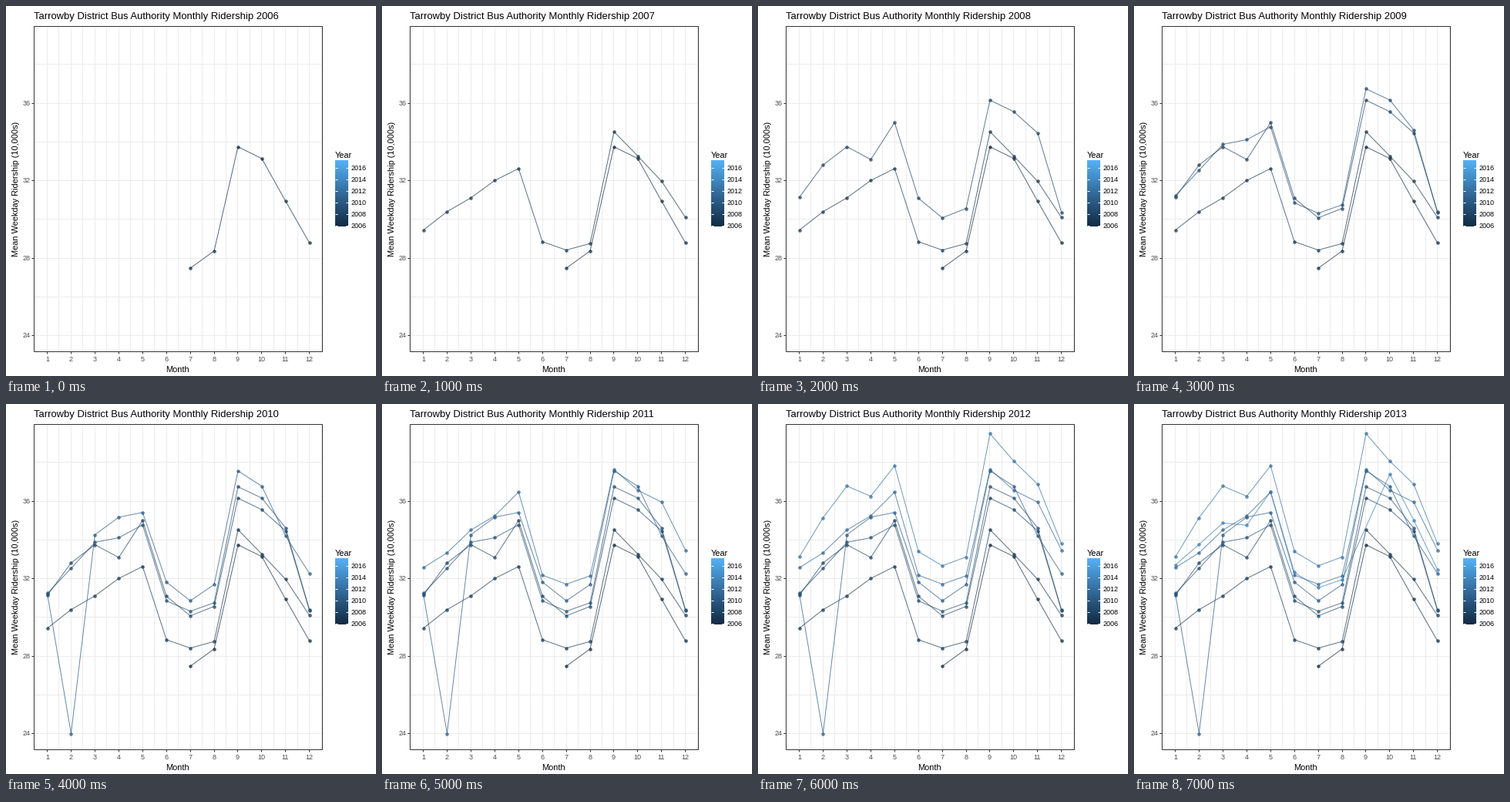
A matplotlib script that plays this animation: 480x480 px, repeating every 8000 ms.

```python
import matplotlib.pyplot as plt
import numpy as np
from matplotlib.animation import FuncAnimation
from matplotlib.colors import LinearSegmentedColormap
from matplotlib.patches import Rectangle

SIZE, DPI = 480, 80
PX = 72 / DPI  # points per pixel
LEFT, RIGHT, TOP, BOTTOM = 36, 410, 25, 447
GRID, FRAME, LABEL = "#EBEBEB", "#333333", "#4D4D4D"
FIRST_YEAR, SCALE_END = 2006, 2017
BLUES = LinearSegmentedColormap.from_list(
    "blues", ["#132B43", "#336A98", "#56B1F7"])

# Typical height of each month, and how far each year lies below it (pixels).
SEASON = np.array([232, 190, 166, 168, 138, 237, 258, 244, 96, 118, 158, 230])
YEAR_SHIFT = [78, 62, 16, 14, -7, -20, -49, -15]
STORM = (2010, 2, 427)
UNREPORTED = (2013, 9)

plt.rcParams["font.family"] = "Liberation Sans"
fig = plt.figure(figsize=(SIZE / DPI, SIZE / DPI), dpi=DPI, facecolor="white")
ax = fig.add_axes([0, 0, 1, 1])
ax.axis("off")


def month_x(month):
    return 53 + 30.93 * (month - 1)


def value_y(value):
    return 426.6 - 25.13 * (value - 24)


def year_heights():
    """Season plus yearly shift, with scatter that calms down in summer."""
    rng = np.random.default_rng(4)
    months = np.arange(1, 13)
    spread = 16 + 10 * np.cos(2 * np.pi * (months - 1) / 12)
    noise = rng.uniform(-1, 1, (len(YEAR_SHIFT), 12)) * spread
    heights = SEASON + np.array(YEAR_SHIFT)[:, None] + noise
    heights[0, :6] = np.nan  # records begin in July
    year, month, y = STORM
    heights[year - FIRST_YEAR, month - 1] = y
    year, month = UNREPORTED
    heights[year - FIRST_YEAR, month - 1] = np.nan
    return heights


def segment(x0, y0, x1, y1, color, z):
    ax.plot([x0, x1], [y0, y1], color=color, lw=PX, zorder=z,
            solid_capstyle="butt")


def label(x, y, text, size, color="black", **kwargs):
    return ax.text(x, y, text, fontsize=size * PX, color=color,
                   va="baseline", **kwargs)


def draw_panel():
    for half in range(1, 26):
        x = round(month_x(half / 2))
        segment(x, TOP, x, BOTTOM, GRID, 1)
    for value in range(24, 39, 2):
        y = int(value_y(value))
        segment(LEFT, y, RIGHT, y, GRID, 1)
    ax.add_patch(Rectangle((LEFT, TOP), RIGHT - LEFT, BOTTOM - TOP,
                           fill=False, ec=FRAME, lw=PX, zorder=5))
    for month in range(1, 13):
        x = round(month_x(month))
        segment(x, BOTTOM, x, BOTTOM + 3, FRAME, 5)
        label(x + 0.5, 460, str(month), 9, LABEL, ha="center")
    for value in range(24, 37, 4):
        y = int(value_y(value))
        segment(LEFT - 3, y, LEFT, y, FRAME, 5)
        label(31.5, y + 3, str(value), 9, LABEL, ha="right")
    label(222.5, 474, "Month", 11, ha="center")
    label(16.5, 236, "Mean Weekday Ridership (10,000s)", 11, ha="center",
          rotation=90, rotation_mode="anchor")


def draw_legend():
    label(427, 196, "Year", 11)
    ramp = np.linspace(1, 0, 86)[:, None]
    ax.imshow(ramp, cmap=BLUES, extent=(427, 444, 285, 199),
              aspect="auto", interpolation="nearest", zorder=2)
    for year in range(2006, 2017, 2):
        y = round(284 - 7.46 * (year - FIRST_YEAR))
        segment(427, y, 430, y, "white", 3)
        segment(441, y, 444, y, "white", 3)
        label(448, y + 3, str(year), 9)


def draw_year(index, heights):
    color = BLUES(index / (SCALE_END - FIRST_YEAR))
    known = ~np.isnan(heights)
    # Half a pixel moves the points to pixel centres.
    x = month_x(np.arange(1, 13))[known] + 0.5
    y = heights[known] - 0.5
    line, = ax.plot(x, y, color=color, alpha=0.7, lw=PX, zorder=3)
    dots, = ax.plot(x, y, ls="none", marker="o", color=color, alpha=0.7,
                    ms=3.6 * PX, mew=0.9 * PX, zorder=4)
    return line, dots


draw_panel()
draw_legend()
title = label(36.5, 16.5, "", 13)
series = [draw_year(i, row) for i, row in enumerate(year_heights())]
# Line snapping puts whole coordinates onto whole pixels with these limits.
ax.set_xlim(0, SIZE)
ax.set_ylim(SIZE - 1, -1)


def update(frame):
    title.set_text("Tarrowby District Bus Authority Monthly Ridership "
                   f"{FIRST_YEAR + frame}")
    for i, artists in enumerate(series):
        for artist in artists:
            artist.set_visible(i <= frame)
    return [title]


anim = FuncAnimation(fig, update, frames=len(YEAR_SHIFT), interval=1000,
                     repeat=True, repeat_delay=0, blit=False)
plt.show()
```
